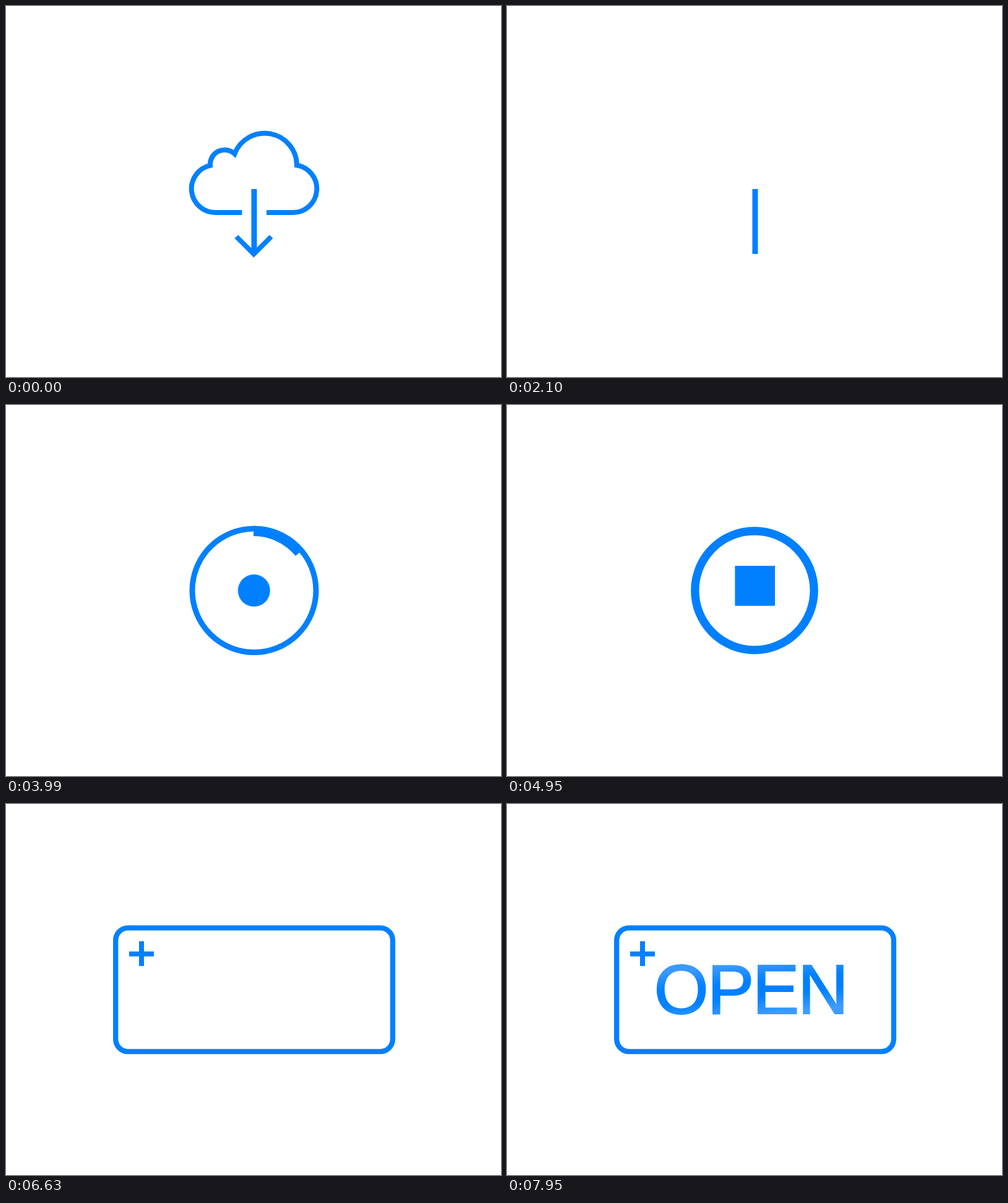
Recreate the animation shown at these times as an HTML page without scripts. Size 800 by 600 pixels, loop 8040 ms.

```html
<!DOCTYPE html>
<html lang="en">
<head>
<meta charset="utf-8">
<title>Download to open</title>
<style>
html, body { margin: 0; width: 100%; height: 100%; overflow: hidden; background: #fff; }
svg { display: block; width: 100vw; height: 100vh; }
.line { fill: none; stroke: #0080ff; }
.trim { stroke-dasharray: 1 2; }

.move {
  animation: 8.04s cubic-bezier(.333, 0, .667, 1) infinite both;
}
.linear { animation-timing-function: linear; }

.cloud { animation-name: cloud; }
.head { animation-name: head; }
.shaft { animation-name: shaft; }
.ring { animation-name: ring; }
.progress { animation-name: progress; }
.stop { animation-name: stop; }
.frame { animation-name: frame; }
.plus { animation-name: plus; }
.o { animation-name: write-o; }
.p { animation-name: write-p; }
.e { animation-name: write-e; }
.n { animation-name: write-n; }

@keyframes cloud {
  0% { stroke-dashoffset: 0; }
  11.194%, 100% { stroke-dashoffset: -1.001; }
}
@keyframes head {
  0%, 18.657% { d: path("M372.3 373L400.5 401L428.7 373"); visibility: visible; }
  26.1% { d: path("M400.5 373L400.5 401L400.5 373"); visibility: visible; }
  26.119%, 100% { d: path("M400.5 373L400.5 401L400.5 373"); visibility: hidden; }
}
@keyframes shaft {
  0%, 33.955% { stroke-dashoffset: 0; }
  45.149%, 100% { stroke-dashoffset: -1.001; }
}
@keyframes ring {
  0%, 33.955% { stroke-dashoffset: 1.001; stroke-width: 9px; }
  45.149%, 55.597% { stroke-dashoffset: 0; stroke-width: 9px; }
  58.955%, 100% { stroke-dashoffset: 0; stroke-width: 0; }
}
@keyframes progress {
  0%, 47.799% { stroke-dashoffset: 1.001; stroke-width: 16.5px; }
  55.597%, 59.018% { stroke-dashoffset: 0; stroke-width: 16.5px; }
  68.159%, 100% { stroke-dashoffset: 0; stroke-width: 0; }
}
/* dot grows, squares off, then shrinks towards its top edge */
@keyframes stop {
  0%, 45.149% { transform: translate(400.75px, 300px) scale(0); rx: 40px; }
  52.612%, 53.358% { transform: translate(400.75px, 300px) scale(1); rx: 40px; }
  58.955%, 59.018% { transform: translate(400.75px, 300px) scale(1); rx: 0px; }
  68.159%, 100% { transform: translate(400.75px, 260.5px) scale(0); rx: 0px; }
}
@keyframes frame {
  0%, 67.537% { stroke-dashoffset: 1.001; }
  80.97%, 100% { stroke-dashoffset: 0; }
}
@keyframes plus {
  0%, 78.731% { transform: translate(219px, 242px) scale(0); }
  82.463%, 100% { transform: translate(219px, 242px) scale(1); }
}
@keyframes write-o {
  0%, 84.701% { stroke-dashoffset: 1.001; }
  90.672%, 100% { stroke-dashoffset: 0; }
}
@keyframes write-p {
  0%, 86.692% { stroke-dashoffset: 1.001; }
  92.662%, 100% { stroke-dashoffset: 0; }
}
@keyframes write-e {
  0%, 88.682% { stroke-dashoffset: 1.001; }
  94.652%, 100% { stroke-dashoffset: 0; }
}
@keyframes write-n {
  0%, 90.672% { stroke-dashoffset: 1.001; }
  96.642%, 100% { stroke-dashoffset: 0; }
}
</style>
</head>
<body>
<svg viewBox="0 0 800 600">
  <defs>
    <linearGradient id="ink" gradientUnits="userSpaceOnUse" x1="390" y1="259" x2="398" y2="341">
      <stop offset="0" stop-color="#3a99ff"/>
      <stop offset=".35" stop-color="#0080ff"/>
      <stop offset=".65" stop-color="#0080ff"/>
      <stop offset="1" stop-color="#3f9bff"/>
    </linearGradient>
    <mask id="pen" maskUnits="userSpaceOnUse" x="230" y="250" width="330" height="100">
      <g fill="none" stroke="#fff" stroke-width="26">
        <path class="move trim o" pathLength="1" d="M282 265A34 35 0 0 0 282 335A34 35 0 0 0 282 265"/>
        <path class="move trim p" pathLength="1" d="M338 350V266H368A20 21 0 0 1 368 308H338"/>
        <path class="move trim e" pathLength="1" d="M474 266H411V334H474M411 299H474"/>
        <path class="move trim n" pathLength="1" d="M484 350V262L538 338V250"/>
      </g>
    </mask>
  </defs>

  <path class="line move linear trim cloud" pathLength="1" stroke-width="8"
    d="M382 334H338.5A38.5 38.5 0 0 1 330 257.9A23.5 23.5 0 0 1 369.5 239A52 52 0 0 1 470 257.5A38.5 38.5 0 0 1 464 334H421"/>
  <path class="line move head" stroke-width="8" d="M372.3 373L400.5 401L428.7 373"/>
  <path class="line move trim shaft" pathLength="1" stroke-width="9" d="M401 296V401"/>

  <path class="line move linear trim ring" pathLength="1" d="M401 400A100 100 0 0 1 401 200A100 100 0 0 1 401 400"/>
  <path class="line move trim progress" pathLength="1" d="M400 203.75A96.25 96.25 0 0 1 400 396.25A96.25 96.25 0 0 1 400 203.75"/>
  <rect class="move stop" x="-40" y="-40" width="80" height="80" fill="#0080ff"/>

  <path class="line move trim frame" pathLength="1" stroke-width="8.3"
    d="M405.2 200.4H605a20 20 0 0 1 20 20V380.3a20 20 0 0 1 -20 20H197.2a20 20 0 0 1 -20 -20V220.4a20 20 0 0 1 20 -20H405.2"/>
  <path class="line move plus" stroke-width="8" d="M-20 .4H20M0 -20V20"/>

  <g mask="url(#pen)">
    <text x="237.6 323.7 396.7 470" y="339" font-family="'Liberation Sans', Arial, sans-serif" font-size="113.5"
      fill="url(#ink)" stroke="url(#ink)" stroke-width="2">OPEN</text>
  </g>
</svg>
</body>
</html>
```
